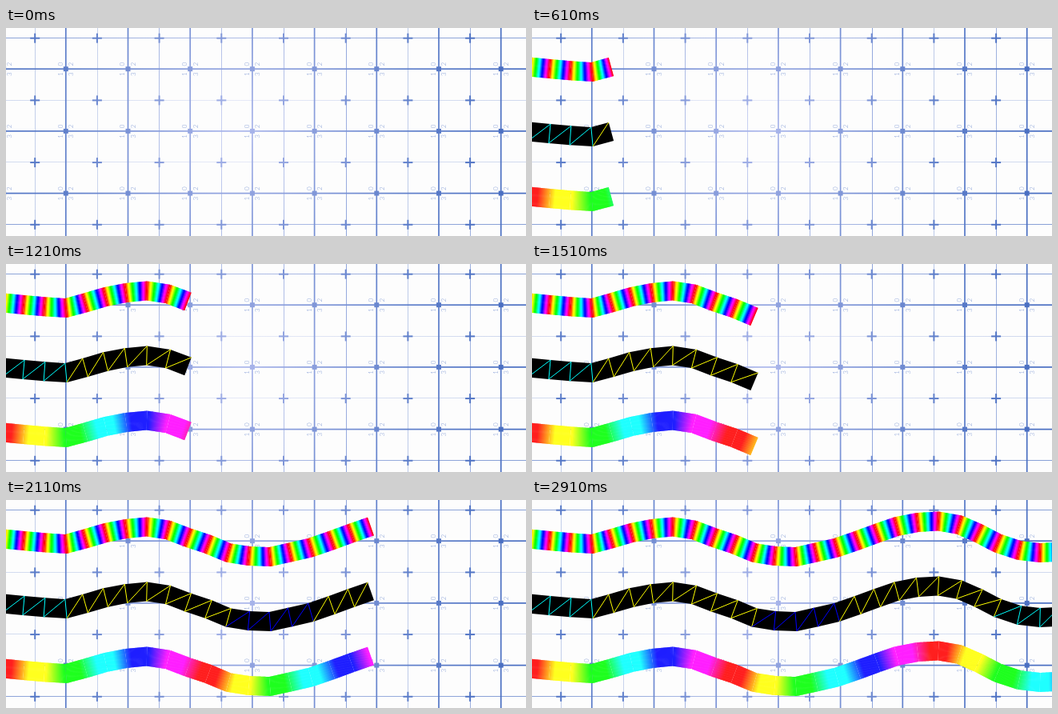
These frames come from a looping animation (650 px wide and 260 px high, 3410 ms). An HTML page with a canvas:

```html
<!DOCTYPE html>
<html>
<head>
<meta charset="utf-8">
<style>
html, body { margin: 0; width: 100%; height: 100%; overflow: hidden; background: #fdfdfd; }
canvas { display: block; }
</style>
</head>
<body>
<canvas id="stage" width="650" height="260"></canvas>
<script>
const c = document.getElementById('stage').getContext('2d');
const LOOP = 3410, HALF = 12, GRID = 77.7, SLICES = 26;
const STARTS = [100, 310, 410, 610, 710, 910, 1010, 1110, 1210, 1410];

// Joints of the ribbon's centre line, middle copy
const JOINTS = [
  [-4, 129.5], [22, 132], [48, 134.3], [75, 136], [99, 129.5], [124.5, 122], [150, 117],
  [176, 114.5], [202.5, 118.5], [227.5, 128], [253, 136.5], [278, 147], [303.5, 151],
  [330, 152], [355, 146.5], [381, 140.5], [407, 131.5], [431.5, 122.5], [456, 114],
  [482, 109], [508, 107.5], [534, 112], [558, 122.5], [582, 135], [609, 144],
  [635, 147], [661, 145.5]
];

const ink = c.createRadialGradient(290, 130, 0, 290, 130, 340);
ink.addColorStop(0, '#adb8ec');
ink.addColorStop(.35, '#8298d9');
ink.addColorStop(.65, '#6080cb');
ink.addColorStop(1, '#4a6fc2');

const bar = (x, y, w, h, alpha = 1) => {
  c.globalAlpha = alpha;
  c.fillRect(x - w / 2, y - h / 2, w, h);
  c.globalAlpha = 1;
};

function label(text, x, y) {
  c.save();
  c.translate(x, y);
  c.rotate(-Math.PI / 2);
  c.globalAlpha = .75;
  c.fillText(text, 0, 0);
  c.restore();
}

function grid() {
  c.fillStyle = '#fdfdfd';
  c.fillRect(0, 0, 650, 260);
  c.fillStyle = ink;
  c.font = '300 8px Lato, "Open Sans", sans-serif';
  c.textAlign = 'center';
  c.textBaseline = 'middle';
  const minorX = [.35, .35, .65, .6, .65, .75, .4, .55];
  const minorY = [.65, .25, .25, .65];
  minorX.forEach((a, i) => bar(Math.round(36 + i * GRID) + .5, 130, 1, 260, a));
  minorY.forEach((a, j) => bar(325, Math.round(12 + j * GRID) + .5, 650, 1, a));
  for (let j = 0; j < 3; j++) bar(325, 51.2 + j * GRID, 650, 1.7);
  for (let i = 0; i < 8; i++) {
    const x = 74.8 + i * GRID;
    bar(x, 130, 1.7, 260);
    for (let j = 0; j < 4; j++) {
      const px = 36.2 + i * GRID, py = 12.7 + j * GRID;
      bar(px, py, 12, 2);
      bar(px, py, 2, 12);
    }
  }
  for (let i = -1; i < 8; i++) for (let j = 0; j < 3; j++) {
    const x = 74.8 + i * GRID, y = 51.2 + j * GRID;
    bar(x, y, 6, 6);
    label('1', x - 6.5, y + 6.5);
    label('0', x - 6.5, y - 6);
    label('3', x + 7, y + 6.5);
    label('2', x + 7, y - 6);
  }
}

// Upper and lower edge points at each of the first n + 1 joints
function edges(n, dy) {
  return JOINTS.slice(0, n + 1).map(([x, y], i) => {
    const a = JOINTS[Math.max(i - 1, 0)], b = JOINTS[Math.min(i + 1, n)];
    const dx = b[0] - a[0], dz = b[1] - a[1], k = HALF / Math.hypot(dx, dz);
    return [[x + dz * k, y + dy - dx * k], [x - dz * k, y + dy + dx * k]];
  });
}

function path(points) {
  c.beginPath();
  points.forEach(p => c.lineTo(...p));
}

const mix = (p, q, u) => [p[0] + (q[0] - p[0]) * u, p[1] + (q[1] - p[1]) * u];

// Rainbow with flat stretches at the six main hues
function rainbow(h, soft, light) {
  const s = h % 1 * 6, f = s % 1;
  const e = Math.min(1, Math.max(0, (f - .5) / soft + .5));
  return `hsl(${(Math.floor(s) + e) * 60} 100% ${light}%)`;
}

function colourRibbon(n, dy, cycle, soft, light) {
  const e = edges(n, dy);
  for (let i = 0; i < n; i++) for (let k = 0; k < SLICES; k++) {
    const u = k / SLICES, v = Math.min(1, (k + 1.6) / SLICES);
    const [a, b] = [e[i], e[i + 1]];
    c.fillStyle = rainbow((i + (k + .5) / SLICES) / cycle, soft, light);
    path([mix(a[0], b[0], u), mix(a[0], b[0], v), mix(a[1], b[1], v), mix(a[1], b[1], u)]);
    c.fill();
  }
}

const wire = i => i < 3 || i > 22 ? '#0ff' : i > 10 && i < 15 ? '#00f' : '#ff0';

function wireRibbon(n) {
  const e = edges(n, 0);
  c.fillStyle = '#000';
  path([...e.map(p => p[0]), ...e.map(p => p[1]).reverse()]);
  c.fill();
  c.lineWidth = 1;
  for (let i = 0; i < n; i++) {
    c.strokeStyle = wire(i);
    path([e[i][1], e[i + 1][0], ...(i + 1 < n ? [e[i + 1][1]] : [])]);
    c.stroke();
  }
}

function segments(t) {
  if (t < 1510) return STARTS.filter(s => s <= t).length;
  return Math.min(26, 11 + Math.floor((t - 1510) / 100) + (t >= 1710));
}

function draw(now) {
  const n = segments(now % LOOP);
  grid();
  if (n) {
    colourRibbon(n, -81, 1, .85, 50);
    wireRibbon(n);
    colourRibbon(n, 81, 10, .5, 56);
  }
  requestAnimationFrame(draw);
}
draw(0);
</script>
</body>
</html>
```
